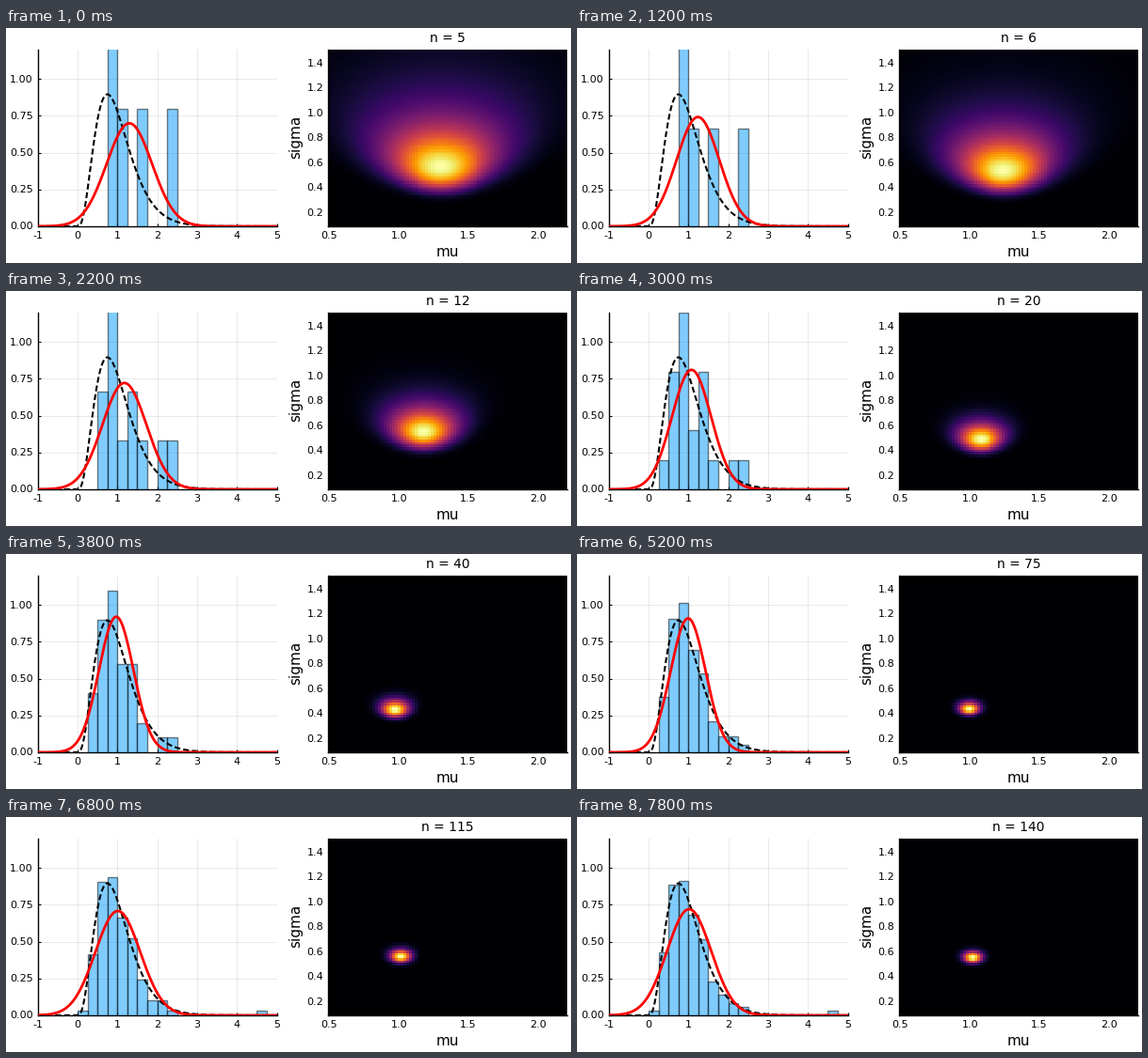
A matplotlib script that plays this animation: 600 by 250 pixels, repeating every 8000 ms.

```python
import numpy as np
import matplotlib.pyplot as plt
from matplotlib.animation import FuncAnimation
from matplotlib.transforms import Affine2D

W, H, DPI = 600, 250, 100
plt.rcParams["font.family"] = "DejaVu Sans"

# Sample size shown in each 200 ms step: a hold, then steps of 1, 2 and 5
SIZES = [5] * 6 + [*range(6, 11), *range(12, 20, 2), *range(20, 141, 5)]

BIN_W = 0.25
EDGES = np.arange(0, 5 + BIN_W, BIN_W)
PHI = (np.sqrt(5) - 1) / 2

FIRST = [0.78, 1.05, 2.30, 0.82, 1.55, 0.94, 0.60, 1.27, 0.80, 2.15, 0.51, 1.35]
BATCHES = [(28, 0.02, 0.88), (35, 0.05, 0.99), (64, 0, 0.995)]
OUTLIER, OUTLIER_AT = 4.74, 94


def gamma_pdf(x):
    """Gamma density with shape 4 and scale 1/4."""
    y = 4 * np.maximum(x, 0)
    return 4 * y ** 3 * np.exp(-y) / 6


def gamma_quantile(u):
    x = np.linspace(0, 5, 2001)
    y = 4 * x
    cdf = 1 - np.exp(-y) * (1 + y + y ** 2 / 2 + y ** 3 / 6)
    return np.interp(u, cdf, x)


def batch(count, lo, hi):
    """Even quantiles from lo to hi, mixed by the golden ratio."""
    rank = np.argsort(np.argsort(np.arange(1, count + 1) * PHI % 1))
    return gamma_quantile(lo + (hi - lo) * (rank + 0.5) / count)


POINTS = np.concatenate([FIRST] + [batch(*b) for b in BATCHES])
POINTS = np.insert(POINTS, OUTLIER_AT, OUTLIER)


def normal_pdf(x, mu, sd):
    return np.exp(-0.5 * ((x - mu) / sd) ** 2) / (sd * np.sqrt(2 * np.pi))


def likelihood(n, mu, sd):
    log = -n * np.log(SIG) - n * ((MU - mu) ** 2 + sd ** 2) / (2 * SIG ** 2)
    return np.exp(log - log.max())


fig = plt.figure(figsize=(W / DPI, H / DPI), dpi=DPI, facecolor="white")


def panel(x0, x1, y0, y1, xticks, yticks, xfmt, yfmt):
    ax = fig.add_axes([x0 / W, 1 - y1 / H, (x1 - x0) / W, (y1 - y0) / H])
    ax.set_axisbelow(True)
    for side, spine in ax.spines.items():
        spine.set_visible(side in ("left", "bottom"))
        spine.set_linewidth(1)
        spine.set_zorder(0.7)
    ax.tick_params(direction="in", length=2.4, width=0.8, pad=3.5, labelsize=8)
    ax.set_xticks(xticks, [format(v, xfmt) for v in xticks])
    ax.set_yticks(yticks, [format(v, yfmt) for v in yticks])
    for label in ax.get_yticklabels():
        label.set_transform(label.get_transform() + Affine2D().translate(0, 0.58))
    return ax


# Page in pixel units for free-standing text
page = fig.add_axes([0, 0, 1, 1])
page.set(xlim=(0, W), ylim=(H, 0))
page.axis("off")
title = page.text(469, 15.3, "", size=10, ha="center", va="baseline")
page.text(469, 243, "mu", size=11, ha="center", va="baseline")
page.text(312, 116, "sigma", size=11, rotation=90, rotation_mode="anchor",
          ha="center", va="baseline")

# Histogram with true and fitted densities
left = panel(33.6, 287.6, 22.95, 210.95, range(-1, 6), np.arange(5) / 4, "d", ".2f")
left.grid(color="black", alpha=0.1, linewidth=0.6)
bars = left.bar(EDGES[:-1], 0 * EDGES[:-1], BIN_W, align="edge", linewidth=1,
                facecolor=(0, 0.604, 0.98, 0.5), edgecolor=(0, 0, 0, 0.5))
xs = np.linspace(-1, 5, 401)
left.plot(xs, gamma_pdf(xs), color="black", linewidth=1.5,
          linestyle=(0, (3, 1.5)), dash_capstyle="butt")
fit, = left.plot(xs, 0 * xs, color="red", linewidth=2)
left.set(xlim=(-1, 5), ylim=(0, 1.2))

# Likelihood over the two parameters
MU, SIG = np.meshgrid(np.linspace(0.5, 2.2, 86), np.linspace(0.1, 1.5, 71))
right = panel(342, 595.9, 23, 211, np.arange(1, 5) / 2, np.arange(1, 8) / 5,
              ".1f", ".1f")
heat = right.imshow(0 * MU, cmap="inferno", vmin=0, vmax=1,
                    extent=(0.49, 2.21, 0.09, 1.51), origin="lower",
                    aspect="auto", interpolation="nearest")


def draw(i):
    n = SIZES[i]
    seen = POINTS[:n]
    mu, sd = seen.mean(), seen.std()
    counts, _ = np.histogram(seen, EDGES)
    for bar, c in zip(bars, counts):
        bar.set_height(c / (n * BIN_W))
        bar.set_visible(c > 0)
    fit.set_ydata(normal_pdf(xs, mu, sd))
    heat.set_data(likelihood(n, mu, sd))
    title.set_text(f"n = {n}")
    return [*bars, fit, heat, title]


anim = FuncAnimation(fig, draw, frames=len(SIZES), interval=200,
                     repeat=True, repeat_delay=0, blit=False)
plt.show()
```
